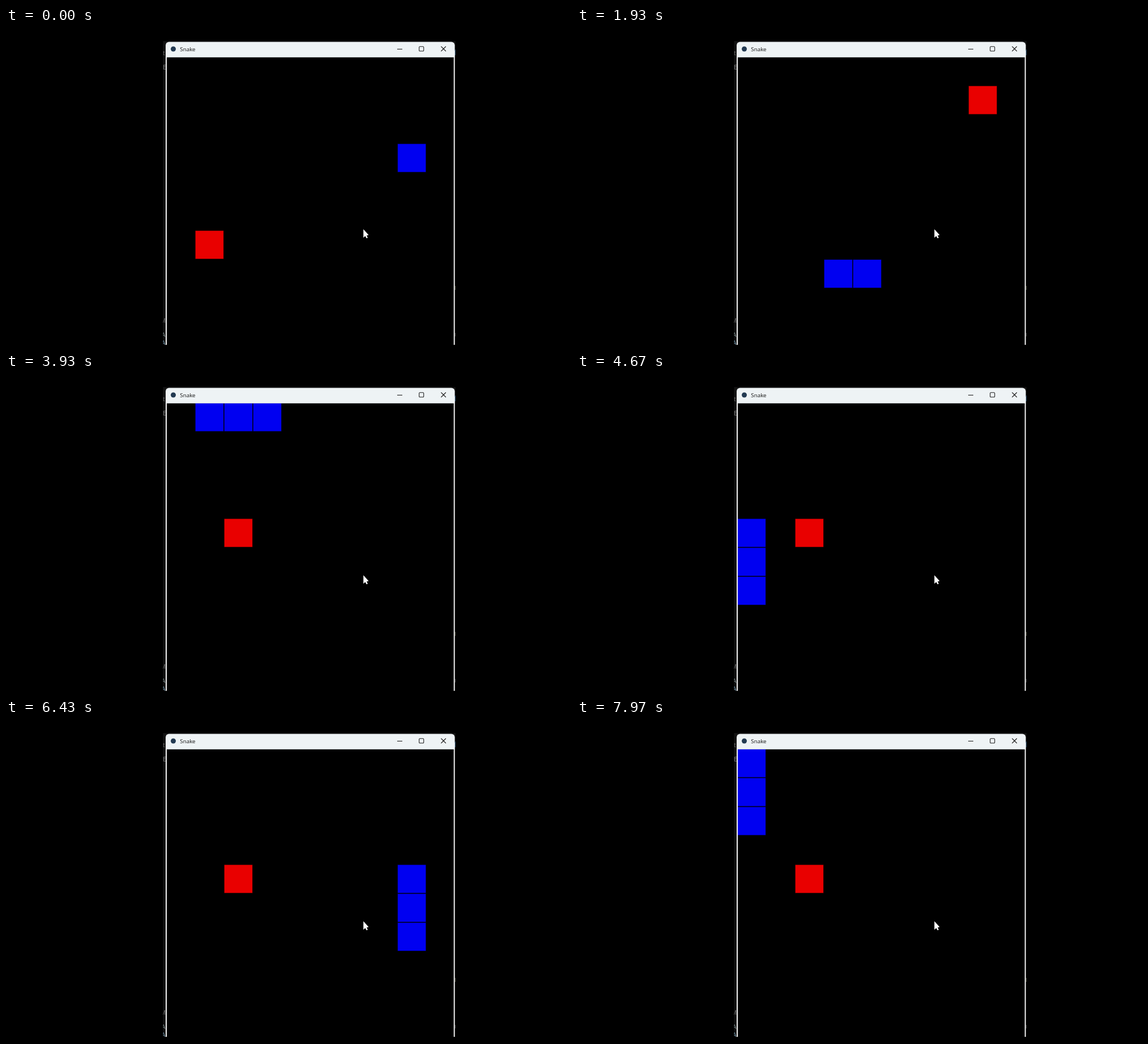
Write an HTML page with a canvas that moves like this. It is 998 px wide and 561 px high and loops after 8 s.

```html
<!DOCTYPE html>
<html lang="en">
<head>
<meta charset="utf-8">
<title>Snake</title>
<style>
html, body { margin: 0; width: 100%; height: 100%; overflow: hidden; background: #000; }
canvas { display: block; }
</style>
</head>
<body>
<canvas id="stage" width="998" height="561"></canvas>
<script>
const ctx = document.getElementById('stage').getContext('2d');
const LOOP = 8000, TICK = 109.7, LEAD = 77;
const LEFT = 283.5, TOP = 51.3, PITCH = 51.05, SIZE = 49.7;
const RED = '#e90000', BLUE = '#0000f1';

// Where the player turns, and where food appears, in grid cells
const turns = [[8, 1], [1, 1], [1, 7], [8, 7], [8, 0], [0, 0], [0, 9], [8, 9], [8, 0], [0, 0], [0, 2]];
const foods = [[1, 6], [8, 1], [2, 4]];

// Play the game once, keeping the head position and meals after every move
function play() {
  let x = 8, y = 3, meals = 0;
  const moves = [{ head: [x, y], meals }];
  for (const [tx, ty] of turns) {
    while (x !== tx || y !== ty) {
      x += Math.sign(tx - x);
      y += Math.sign(ty - y);
      const [fx, fy] = foods[meals];
      if (x === fx && y === fy) meals++;
      moves.push({ head: [x, y], meals });
    }
  }
  return moves;
}
const moves = play();

function rect(color, x, y, w, h) {
  ctx.fillStyle = color;
  ctx.fillRect(x, y, w, h);
}

function clipped(x, y, w, h, paint) {
  ctx.save();
  ctx.beginPath();
  ctx.rect(x, y, w, h);
  ctx.clip();
  paint();
  ctx.restore();
}

// A square with a slightly soft edge
function cell([col, row], color) {
  const x = LEFT + col * PITCH, y = TOP + row * PITCH;
  ctx.globalAlpha = 0.4;
  rect(color, x - 0.3, y - 0.3, SIZE + 0.6, SIZE + 0.6);
  ctx.globalAlpha = 1;
  rect(color, x + 0.3, y + 0.3, SIZE - 0.6, SIZE - 0.6);
}

function line(...points) {
  ctx.beginPath();
  points.forEach(([x, y]) => ctx.lineTo(x, y));
  ctx.stroke();
}

function text(str, x, y, size, color) {
  ctx.font = `${size}px "Open Sans", "Noto Sans", sans-serif`;
  ctx.fillStyle = color;
  ctx.fillText(str, x, y);
}

// Sliver of the editor showing behind the window
function backdrop() {
  rect('#131313', 277.5, 23, 516.5, 536);
  clipped(277.5, 23, 4.5, 536, () => {
    text('t', 277, 48, 10, '#777');
    text('E', 277, 73, 10, '#888');
    text('M', 273, 520, 10, '#777');
    text('A', 275, 545, 10, '#8a9a9a');
    text('A', 275, 559, 10, '#7aa0b8');
  });
  rect('#345a78', 793, 38, 1, 10);
  rect('#665', 793, 455, 1, 7);
  rect('#555', 793, 538, 1, 6);
}

function titleBar() {
  ctx.fillStyle = '#eef3f5';
  ctx.beginPath();
  ctx.roundRect(282, 24.5, 510.7, 27.2, [6, 6, 0, 0]);
  ctx.fill();

  ctx.fillStyle = '#233a52';
  ctx.beginPath();
  ctx.arc(295.5, 37, 4.5, 0, Math.PI * 2);
  ctx.fill();
  text('Snake', 307.3, 41, 9.8, '#151515');

  ctx.strokeStyle = '#1c1c1c';
  ctx.lineWidth = 1.1;
  line([691, 37.3], [700, 37.3]);
  ctx.beginPath();
  ctx.roundRect(729.8, 32.8, 8, 8, 1.3);
  ctx.stroke();
  line([768.5, 32.5], [777, 41]);
  line([777, 32.5], [768.5, 41]);
}

function pointer() {
  ctx.fillStyle = '#fff';
  ctx.fill(new Path2D('M631.3 355V370L634.5 367L636.8 371L639 370L637 365.9L640.6 365.2Z'));
}

function draw(t) {
  rect('#000', 0, 0, 998, 561);
  backdrop();
  rect('#f2f2f2', 282, 40, 510.7, 519);
  rect('#000', 284, 51, 506.8, 508);

  const step = Math.min(Math.floor((t + LEAD) / TICK), moves.length - 1);
  const { meals } = moves[step];
  clipped(284, 51, 506.8, 507.6, () => {
    cell(foods[meals], RED);
    for (let i = 0; i <= meals; i++) cell(moves[Math.max(0, step - i)].head, BLUE);
  });

  titleBar();
  pointer();
}

const start = performance.now();
function tick() {
  draw((performance.now() - start) % LOOP);
  requestAnimationFrame(tick);
}
tick();
</script>
</body>
</html>
```
